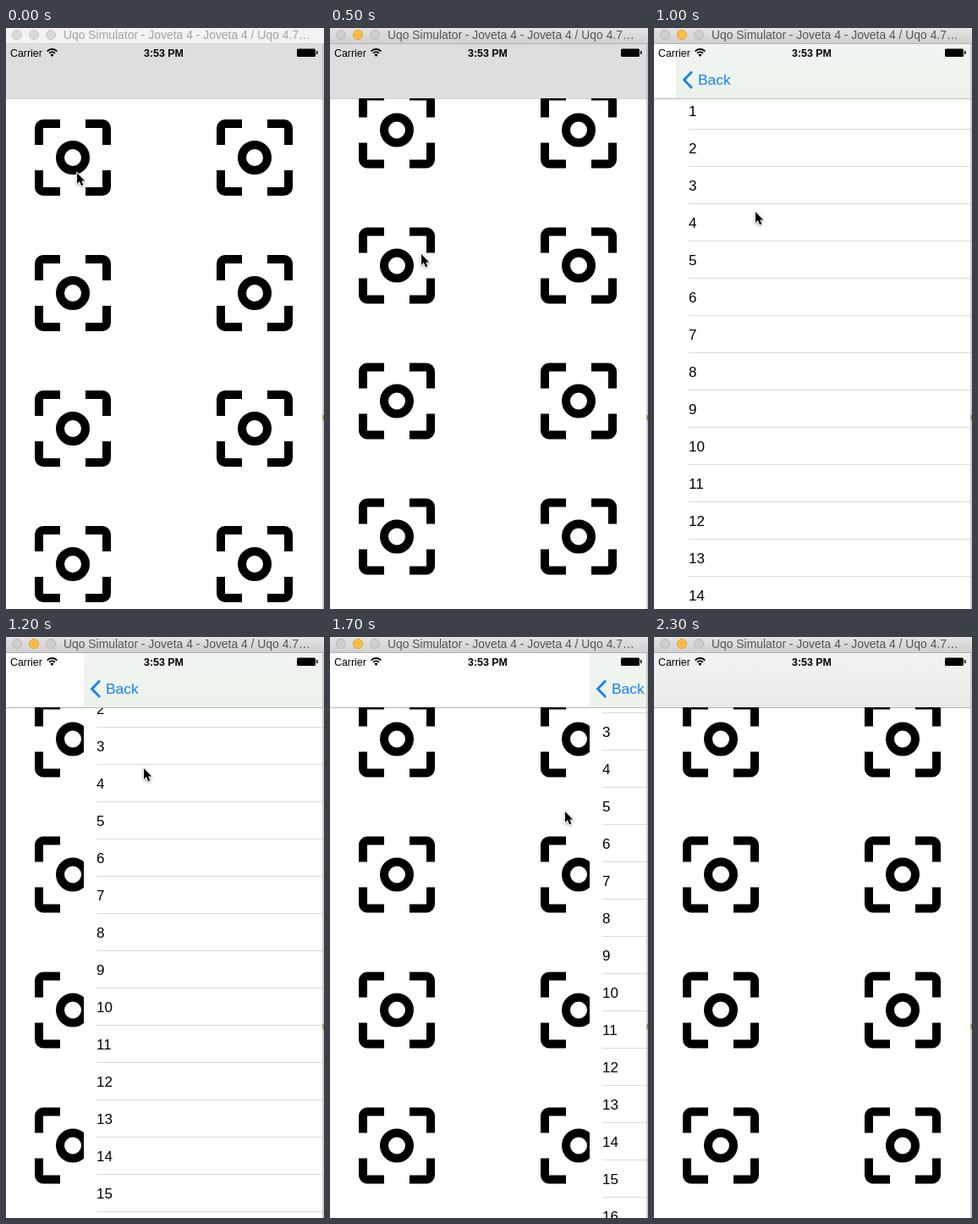
These frames come from a looping animation (376x686 px, 2.4 s). An HTML page with a canvas:

```html
<!DOCTYPE html>
<html lang="en">
<head>
<meta charset="utf-8">
<title>Swipe back</title>
<style>
html, body { margin: 0; width: 376px; height: 686px; overflow: hidden; background: #fff; }
canvas { display: block; width: 376px; height: 686px; }
</style>
</head>
<body>
<canvas id="stage"></canvas>
<script>
const W = 376, H = 686, LOOP = 2400, STEP = 100;
const TOP = 19, BAR = 83, EDGE = 375;
const ROW = 44, PITCH = 160;
const FONT = '"Liberation Sans", Arial, sans-serif';
const BLUE = '#1580f5';
const canvas = document.getElementById('stage');
const ctx = canvas.getContext('2d');
const ratio = window.devicePixelRatio || 1;
canvas.width = W * ratio;
canvas.height = H * ratio;

// Motion
const part = (t, from, to) => Math.min(1, Math.max(0, (t - from) / (to - from)));
const smooth = u => u * u * (3 - 2 * u);
const easeOut = u => 1 - (1 - u) ** 2.9;

const gridScroll = t => 32.5 * easeOut(part(t, 200, 500));
const listScroll = t => Math.round(125 * easeOut(part(t, 900, 1500)));
const pageShift = t => Math.round(t < 800
  ? W * (1 - easeOut(part(t, 600, 800)))
  : W * smooth(part(t, 800, 2040)));

const stops = [
  { t: 0, x: 84, y: 171 }, { t: 500, x: 108, y: 267 }, { t: 800, x: 77, y: 279 },
  { t: 1200, x: 163, y: 155 }, { t: 1500, x: 264, y: 206 },
  { t: 1900, x: 292, y: 206 }, { t: 2300, x: 310, y: 720 }
];

function pointer(t) {
  const i = stops.findIndex(s => s.t >= t);
  if (i < 1) return stops[0];
  const a = stops[i - 1], b = stops[i], k = smooth(part(t, a.t, b.t));
  return { x: a.x + (b.x - a.x) * k, y: a.y + (b.y - a.y) * k };
}

// Drawing helpers
function rect(x, y, w, h, color) {
  ctx.fillStyle = color;
  ctx.fillRect(x, y, w, h);
}

function pill(x, y, w, h, r, color) {
  ctx.fillStyle = color;
  ctx.beginPath();
  ctx.roundRect(x, y, w, h, r);
  ctx.fill();
}

function disc(x, y, r, fill, stroke) {
  ctx.beginPath();
  ctx.arc(x, y, r, 0, Math.PI * 2);
  if (fill) { ctx.fillStyle = fill; ctx.fill(); }
  if (stroke) { ctx.strokeStyle = stroke; ctx.stroke(); }
}

function text(s, x, y, size, color, weight = '') {
  ctx.font = `${weight} ${size}px ${FONT}`;
  ctx.fillStyle = color;
  ctx.fillText(s, x, y);
}

function shade(y0, y1, from, to) {
  const g = ctx.createLinearGradient(0, y0, 0, y1);
  g.addColorStop(0, from);
  g.addColorStop(1, to);
  return g;
}

function clipped(x, y, w, h, draw) {
  ctx.save();
  ctx.beginPath();
  ctx.rect(x, y, w, h);
  ctx.clip();
  draw();
  ctx.restore();
}

function focusIcon(cx, cy) {
  ctx.save();
  ctx.translate(cx, cy);
  ctx.fillStyle = '#000';
  for (let i = 0; i < 4; i++) {
    ctx.beginPath();
    ctx.moveTo(-45, -15);
    ctx.lineTo(-45, -35);
    ctx.arcTo(-45, -45, -35, -45, 10);
    ctx.lineTo(-15, -45);
    ctx.lineTo(-15, -35);
    ctx.lineTo(-35, -35);
    ctx.lineTo(-35, -15);
    ctx.fill();
    ctx.rotate(Math.PI / 2);
  }
  ctx.lineWidth = 10;
  disc(0, 0, 15, null, '#000');
  ctx.restore();
}

function gridPage(t) {
  let fill = '#fff', line = '#b4b4b4';
  if (t < 700) { fill = '#dedede'; line = '#d0d0d0'; }
  else if (t >= 2100) fill = shade(TOP, BAR, '#f2f4f3', '#e9ebea');
  rect(0, TOP, EDGE, BAR - TOP, fill);
  rect(0, BAR, EDGE, 1, line);
  clipped(0, BAR, EDGE, H - BAR, () => {
    for (let y = 153 - gridScroll(t); y < H; y += PITCH) {
      focusIcon(79, y);
      focusIcon(294, y);
    }
  });
}

function listPage(t) {
  const shift = pageShift(t), scroll = listScroll(t);
  if (shift >= EDGE) return;
  clipped(shift, TOP, EDGE - shift, H - TOP, () => {
    ctx.translate(shift, 0);
    rect(0, TOP, W, H, '#fff');
    for (let i = 0; i < 18; i++) {
      const y = BAR + i * ROW - scroll;
      text(String(i), 15, y + 28, 17, '#000');
      rect(15, y + ROW - 1, W, 1, '#d9d9db');
    }
    if (t >= 800 && t < 1200) pill(368, 86 + scroll * 0.48, 3, 288, 1.5, '#b0b0b0');
    rect(0, TOP, W, BAR - TOP, shade(TOP, BAR, '#f1f4f1', '#ecf3eb'));
    rect(0, BAR, W, 1, '#b8bcb8');
    ctx.strokeStyle = BLUE;
    ctx.lineWidth = 2.8;
    ctx.beginPath();
    ctx.moveTo(19, 51.5);
    ctx.lineTo(9.5, 61.2);
    ctx.lineTo(19, 71);
    ctx.stroke();
    text('Back', 26, 67, 17.4, BLUE);
  });
}

function statusBar() {
  text('Carrier', 5, 34, 12.4, '#000');
  text('3:53 PM', 163, 34, 12.4, '#000', 'bold');
  ctx.strokeStyle = '#000';
  ctx.lineWidth = 1.8;
  const from = -Math.PI * 0.76, to = -Math.PI * 0.24;
  for (const r of [4.6, 8]) {
    ctx.beginPath();
    ctx.arc(54.5, 33, r, from, to);
    ctx.stroke();
  }
  ctx.fillStyle = '#000';
  ctx.beginPath();
  ctx.moveTo(54.5, 34);
  ctx.arc(54.5, 33.5, 2.8, from, to);
  ctx.fill();
  pill(344, 24.5, 22, 9.5, 1.5, '#000');
  rect(367, 27, 1.5, 4, '#000');
}

function titleBar(active) {
  rect(0, 0, W, 18, active ? shade(0, 18, '#e4e4e4', '#d0d0d0') : '#f3f3f3');
  rect(0, 18, W, 1, active ? '#b2b2b2' : '#d2d2d2');
  ctx.lineWidth = 1;
  for (let i = 0; i < 3; i++) {
    const x = 13 + i * 20;
    if (active && i === 1) disc(x, 8, 5.5, '#fdbe41', '#dfa033');
    else disc(x, 8, 5.5, active ? '#cfcfcf' : '#d9d9d9', active ? '#b9b9b9' : '#c6c6c6');
  }
  text('Uqo Simulator - Joveta 4 - Joveta 4 / Uqo 4.7…', 68, 13, 13.9, active ? '#555' : '#a2a2a2');
}

function arrow({ x, y }) {
  ctx.save();
  ctx.translate(x, y);
  ctx.scale(0.92, 0.92);
  ctx.beginPath();
  ctx.moveTo(0, 0);
  ctx.lineTo(0, 14);
  ctx.lineTo(3.2, 11);
  ctx.lineTo(5.4, 16.5);
  ctx.lineTo(8, 15.4);
  ctx.lineTo(5.8, 10.2);
  ctx.lineTo(10, 10.2);
  ctx.closePath();
  ctx.lineJoin = 'round';
  ctx.lineWidth = 2;
  ctx.strokeStyle = '#fff';
  ctx.shadowColor = 'rgba(0,0,0,0.4)';
  ctx.shadowBlur = 3 * ratio;
  ctx.shadowOffsetY = ratio;
  ctx.stroke();
  ctx.shadowColor = 'transparent';
  ctx.fillStyle = '#000';
  ctx.fill();
  ctx.restore();
}

function draw(t) {
  ctx.setTransform(ratio, 0, 0, ratio, 0, 0);
  rect(0, 0, W, H, '#fff');
  gridPage(t);
  listPage(t);
  statusBar();
  titleBar(t >= 100);
  rect(EDGE - 0.5, TOP, 1, H - TOP, '#989898');
  rect(EDGE - 0.5, 457, 1.5, 6, '#8f8f3a');
  arrow(pointer(t));
}

function tick(now) {
  draw(Math.floor((now % LOOP) / STEP) * STEP);
  requestAnimationFrame(tick);
}
draw(0);
requestAnimationFrame(tick);
</script>
</body>
</html>
```
